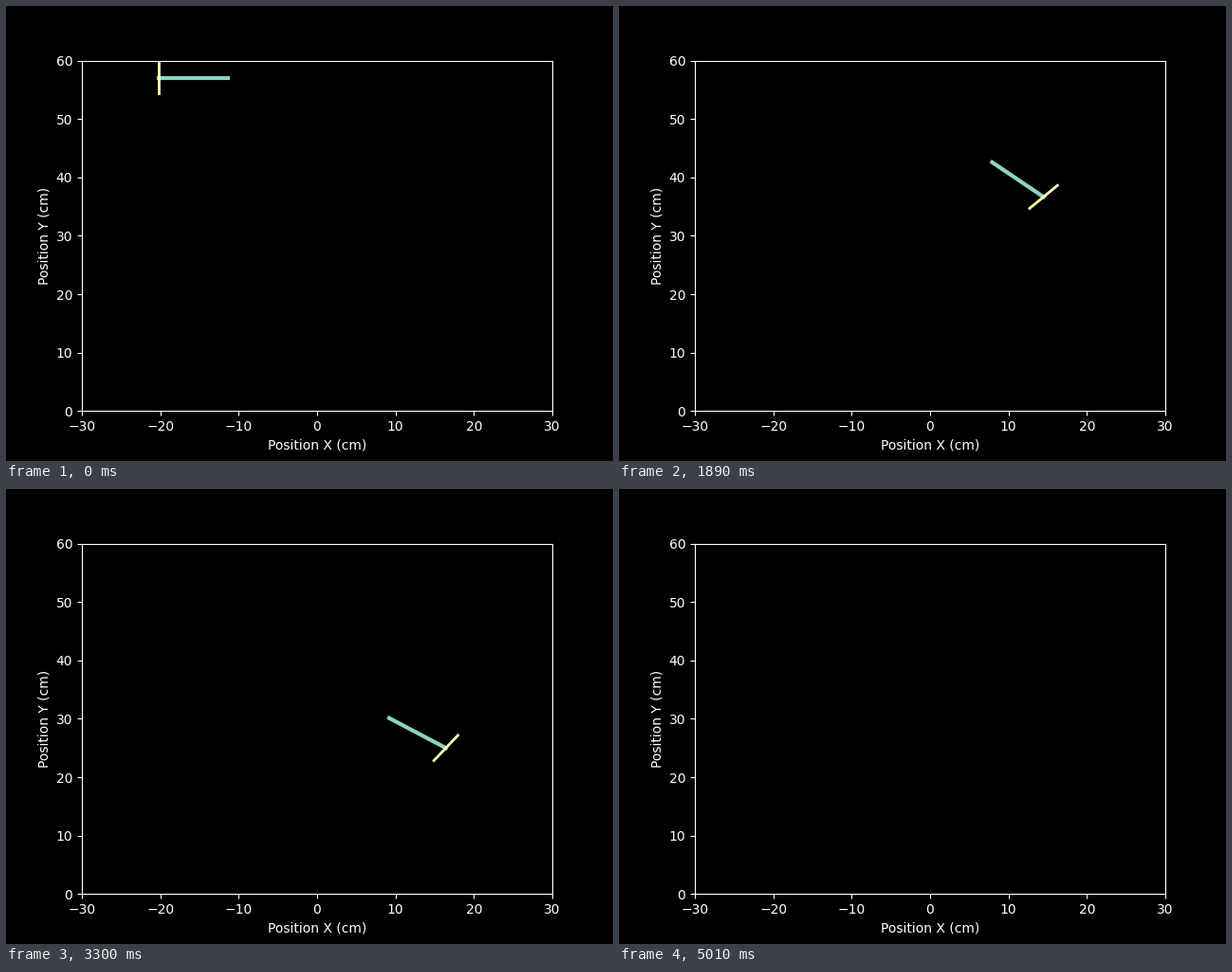
A matplotlib script that plays this animation: 640x480 px, repeating every 6420 ms.

```python
import numpy as np
import matplotlib.pyplot as plt
from matplotlib.animation import FuncAnimation

FRAMES, STEP = 214, 30      # one loop of 6420 ms
ARM = 20.2                  # falling pivot to crossbar, cm
ROD = 8.85                  # visible part of the arm
HALF_BAR = 2.65
OMEGA = 0.1557              # small-swing rate, rad per frame


def swing(count, sub=40):
    """Angle of a damped pendulum released at rest from the horizontal."""
    angles = np.empty(count)
    angle, rate, dt = np.pi / 2, 0.0, 1 / sub
    for n in range(count):
        angles[n] = angle
        damping = 0.0059 + 0.000015 * n
        for _ in range(sub):
            rate -= (OMEGA**2 * np.sin(angle) + damping * rate) * dt
            angle += rate * dt
    return angles


def pivot(n):
    """Pivot drifts slightly sideways while it falls faster and faster."""
    x = np.interp(n, [0, 24, 47, 63, 97, 123, 150],
                  [0, -0.7, -0.62, -0.5, -0.17, 0.05, 0.12])
    y = 57 - 1.935 * (n * STEP / 1000) ** 1.97
    return np.array([x, y])


angles = swing(FRAMES)

plt.style.use("dark_background")
fig, ax = plt.subplots(figsize=(6.4, 4.8), dpi=100)
ax.set(xlim=(-30, 30), ylim=(0, 60),
       xlabel="Position X (cm)", ylabel="Position Y (cm)")
rod, = ax.plot([], [], color="#8dd3c7", lw=3)
bar, = ax.plot([], [], color="#feffb3", lw=2)


def draw(n):
    up = np.array([np.sin(angles[n]), np.cos(angles[n])])
    side = np.array([up[1], -up[0]])
    foot = pivot(n) - ARM * up
    rod.set_data(*zip(foot, foot + ROD * up))
    bar.set_data(*zip(foot - HALF_BAR * side, foot + HALF_BAR * side))
    return rod, bar


anim = FuncAnimation(fig, draw, frames=FRAMES, interval=STEP,
                     init_func=lambda: draw(0), repeat=True, repeat_delay=0)
plt.show()
```
